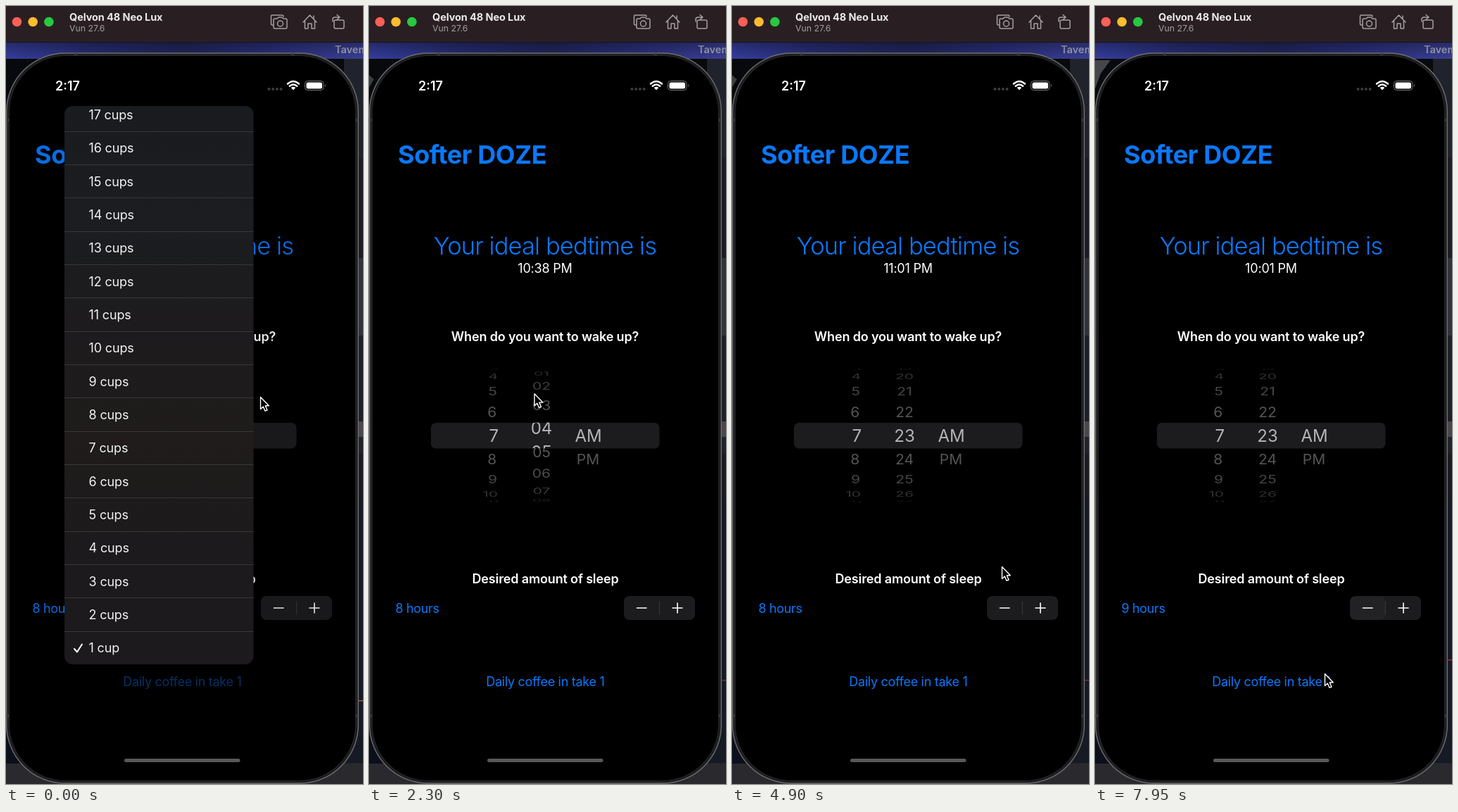
An HTML page with a canvas that plays this animation: 507 px wide and 1105 px high, repeating every 8 s.

```html
<!DOCTYPE html>
<html lang="en">
<head>
<meta charset="utf-8">
<title>Bedtime planner</title>
<style>
html, body { margin: 0; width: 100%; height: 100%; overflow: hidden; background: #000; }
canvas { display: block; }
</style>
</head>
<body>
<canvas id="stage" width="507" height="1105"></canvas>
<script>
const ctx = document.getElementById('stage').getContext('2d');
const LOOP = 8000, STEP = 50;
const BLUE = '#0a78fb', PANEL = '#1c1c1f';
const clamp = x => Math.max(0, Math.min(1, x));
const mix = (a, b, p) => a + (b - a) * p;
const smooth = p => p * p * (3 - 2 * p);

function text(str, x, y, size, color, { weight = 400, align = 'left', spacing = 0 } = {}) {
  ctx.font = `${weight} ${size}px Inter, sans-serif`;
  ctx.letterSpacing = spacing + 'px';
  ctx.textAlign = align;
  ctx.fillStyle = color;
  ctx.fillText(str, x, y);
}
function rect(x, y, w, h, color) {
  ctx.fillStyle = color;
  ctx.fillRect(x, y, w, h);
}
function round(x, y, w, h, r, fill, stroke, width = 1) {
  ctx.beginPath();
  ctx.roundRect(x, y, w, h, r);
  if (fill) { ctx.fillStyle = fill; ctx.fill(); }
  if (stroke) { ctx.strokeStyle = stroke; ctx.lineWidth = width; ctx.stroke(); }
}
function path(d, { x = 0, y = 0, fill, stroke, width = 1.5 } = {}) {
  const shape = new Path2D(d);
  ctx.save();
  ctx.translate(x, y);
  ctx.lineWidth = width;
  ctx.lineJoin = ctx.lineCap = 'round';
  if (fill) { ctx.fillStyle = fill; ctx.fill(shape); }
  if (stroke) { ctx.strokeStyle = stroke; ctx.stroke(shape); }
  ctx.restore();
}
function dot(x, y, r, color) {
  ctx.beginPath();
  ctx.arc(x, y, r, 0, 7);
  ctx.fillStyle = color;
  ctx.fill();
}
function gradient(x0, y0, x1, y1, ...colors) {
  const g = ctx.createLinearGradient(x0, y0, x1, y1);
  colors.forEach((c, i) => g.addColorStop(i / (colors.length - 1), c));
  return g;
}

// Desktop peeking out around the simulator window
function drawDesktop(t) {
  rect(0, 0, 507, 1105, gradient(0, 75, 0, 1105, '#08090c', '#0b0c10', '#0c101c'));
  rect(480, 75, 27, 1030, '#20232b');
  rect(500, 215, 7, 143, '#1d1c26');
  rect(500, 358, 7, 110, '#30343a');
  rect(500, 468, 7, 122, '#1c2028');
  rect(500, 590, 7, 22, '#4b474b');
  rect(500, 636, 7, 64, '#1b1a22');
  rect(480, 700, 27, 375, '#151a25');
  rect(0, 1076, 507, 29, '#2a2a2e');
  const [lineY, lineColor] = t < 350 ? [986, '#a8572b'] : t < 7200 ? [957, '#7d2c2c'] : [928, '#b02a2a'];
  rect(500, lineY, 7, 1.5, lineColor);
  if (t >= 7200) path('M0 77 H22 L8 96 L0 118 Z', { fill: '#45474a' });
  else if (t >= 350) path('M0 98 L7 104 L0 116 Z', { fill: '#3b3d40' });
  rect(0, 52, 507, 23, gradient(0, 0, 507, 0, '#353d9c', '#262c72', '#20265c', '#2a307c', '#3a3f94'));
  text('Tavem', 467, 67, 14.5, '#a9abc4', { weight: 600 });
  rect(0, 52, 507, 23, gradient(0, 52, 0, 75, 'rgba(0,0,0,.3)', 'rgba(0,0,0,0)'));
}

function drawTitleBar() {
  rect(0, 0, 507, 52, '#291f23');
  rect(0, 51, 507, 1, '#1a1417');
  ['#fe5f57', '#febc2e', '#28c840'].forEach((c, i) => dot(15.5 + 22.7 * i, 22.5, 6.8, c));
  text('Qelvon 48 Neo Lux', 90, 20.5, 14.5, '#ece8ea', { weight: 700, spacing: -0.1 });
  text('Vun 27.6', 90, 36, 12.3, '#a39c9f');
  const icon = { stroke: '#a69fa2', width: 1.5 };
  path('M379 27 H378 Q376.500 27 376.500 25 V15 Q376.500 13 378 13 H392 Q394 13 394 15 M382 18 H385 L387 16 H392 L394 18 H397 Q399 18 399 20 V30 Q399 32 397 32 H382 Q380 32 380 30 V20 Q380 18 382 18 Z M393.500 25 a4 4 0 1 0 -8 0 a4 4 0 1 0 8 0', icon);
  path('M422 23 L431.500 13 L441 23 M424.500 21 V32 H429 V25 H434 V32 H438.500 V21 M437 18 V14', icon);
  path('M468 20 H478 Q480 20 480 22 V30 Q480 32 478 32 H468 Q466 32 466 30 V22 Q466 20 468 20 M464 22 V19 Q464 16 467 16 H473 M470 12.500 L474 16 L470 19.500', icon);
}

function drawPhone() {
  round(0.8, 67, 499.500, 1037, 83, '#1d1d1f', '#6e6e70', 1.4);
  round(4.5, 70.5, 492, 1030, 80, '#000', '#29292b', 1);
  [97, 405].forEach(x => rect(x, 67, 4, 3, '#39393b'));
  [160, 1006].forEach(y => [1, 497].forEach(x => rect(x, y, 3, 4, '#39393b')));
  text('2:17', 70, 119.5, 18, '#fff', { weight: 600 });
  for (let i = 0; i < 4; i++) dot(373.5 + 5.7 * i, 118, 2, '#3d3d3f');
  path('M400 110.500 Q408 103.500 416 110.500 M402.800 113.700 Q408 109.200 413.200 113.700', { stroke: '#fff', width: 2.5 });
  path('M404.800 116 Q408 113.500 411.200 116 L408 119.500 Z', { fill: '#fff' });
  round(424.5, 106.5, 26.5, 13, 4, null, '#777', 1);
  round(426.5, 108.5, 22.5, 9, 2.5, '#fff');
  path('M453 111 Q455 113 453 115 Z', { fill: '#777' });
  round(168, 1069, 164.5, 5, 2.5, '#58585a');
}

// Wheel values in rows: a short drag, then a flick that slows down and settles
function minuteAt(t) {
  if (t < 2200) return mix(56, 60, clamp((t - 2050) / 150));
  return 83 - Math.max(0, 27.2 * Math.exp(-(t - 2120) / 490) - 0.15);
}
function hourAt(t) {
  if (t < 3350) return mix(7, 10, clamp((t - 3050) / 300) ** 2);
  return 31 - 21 * (1 - clamp((t - 3350) / 1625)) ** 3;
}
function firstTime(test) {
  let t = 0;
  while (t < LOOP && !test(t)) t += STEP;
  return t;
}
const noon = firstTime(t => hourAt(t) >= 12), midnight = firstTime(t => hourAt(t) >= 24);
const halfDayAt = t => smooth(clamp((t - noon) / 250)) - smooth(clamp((t - midnight) / 250));

function drawWheel(value, label, x, align, innerShift) {
  const middle = 610, radius = 95, angle = 0.36;
  const region = (rects, draw) => {
    ctx.save();
    ctx.beginPath();
    rects.forEach(r => ctx.rect(...r));
    ctx.clip();
    draw();
    ctx.restore();
  };
  const rows = draw => {
    for (let i = Math.round(value) - 4; i <= Math.round(value) + 4; i++) {
      const a = (i - value) * angle;
      if (Math.abs(a) < 1.55 && label(i)) draw(label(i), middle + radius * Math.sin(a), Math.cos(a));
    }
  };
  region([[88, 515, 324, 77], [88, 628, 324, 77]], () => rows((str, y, depth) => {
    const grey = 24 + (depth - 0.13) * 76;
    ctx.save();
    ctx.translate(x + (align === 'right' ? 4 * (1 - depth) : 0), y);
    ctx.scale(1, depth);
    text(str, 0, 7.6, 21, `rgb(${grey},${grey},${grey})`, { align });
    ctx.restore();
  }));
  region([[88, 592, 324, 36]], () => rows((str, y) =>
    text(str, x + innerShift, y + 8.6, 24, '#b4b4b6', { align })));
}

const plusClicks = [5300, 5530, 5760, 5980], minusClicks = [6750, 7100, 7450];
const countBefore = (clicks, t) => clicks.filter(c => t >= c).length;
const hoursAt = t => 8 + countBefore(plusClicks, t) - countBefore(minusClicks, t);
function pressAt(clicks, t) {
  const last = clicks.filter(c => t >= c).pop();
  return last === undefined ? 0 : 1 - clamp((t - last - 130) / 450);
}
function bedtimeAt(t) {
  if (t < 4700) return '10:38 PM';
  return `${11 - (hoursAt(t) - 8)}:01 PM`;
}

function drawStepper(t) {
  const hours = hoursAt(t);
  text(hours + ' hours', 37.5, 861.5, 18, BLUE, { spacing: -0.35 });
  round(362, 838, 101, 34, 8, PANEL);
  const shade = (x, amount) => {
    if (amount) round(x, 838, 50.5, 34, 8, `rgba(66,66,70,${amount * 0.9})`);
  };
  shade(362, pressAt(minusClicks, t));
  shade(412.5, pressAt(plusClicks, t));
  rect(412, 846, 1, 18, '#38373b');
  path('M380.500 855 H394', { stroke: '#fff', width: 1.6 });
  path('M431 855 H445 M438 848 V862', { stroke: hours >= 12 ? '#77777a' : '#fff', width: 1.6 });
}

function drawApp(t) {
  const heading = { align: 'center', weight: 600, spacing: -0.15 };
  text('Softer DOZE', 41, 224, 36, BLUE, { weight: 700, spacing: -0.4 });
  text('Your ideal bedtime is', 250, 352.5, 34.5, BLUE, { weight: 300, align: 'center', spacing: -0.9 });
  text(bedtimeAt(t), 250, 378.5, 18, '#fff', { align: 'center', spacing: -0.2 });
  text('When do you want to wake up?', 250, 476, 18, '#fff', heading);
  round(88, 592, 324.5, 36.5, 7, PANEL);
  drawWheel(hourAt(t), i => String((i + 11) % 12 + 1), 181, 'right', 3);
  drawWheel(minuteAt(t), i => String(i % 60).padStart(2, '0'), 245, 'center', 0);
  drawWheel(halfDayAt(t), i => ['AM', 'PM'][i], 311, 'center', 0.5);
  text('Desired amount of sleep', 250.5, 820, 18, '#fff', heading);
  drawStepper(t);
  ctx.globalAlpha = mix(0.4, 1, clamp((t - 150) / 300));
  text('Daily coffee in take 1', 250.3, 965.5, 18, BLUE, { align: 'center', spacing: -0.3 });
  ctx.globalAlpha = 1;
}

function drawMenu(t) {
  const p = t < 200 ? 0 : clamp((t - 140) / 350);
  if (p === 1) return;
  rect(5, 135, 491, 800, `rgba(0,0,0,${0.1 * (1 - p)})`);
  const scale = 1 - 0.8 * p;
  ctx.save();
  ctx.globalAlpha = 1 - p;
  ctx.translate(250, 945);
  ctx.scale(scale, scale);
  ctx.translate(-250, -945);
  round(83, 142, 268.5, 793, 12, gradient(0, 142, 0, 935, '#1a1b1e', '#1b1d20', '#1d1b1d', '#1f1c1b', '#1c1a1c', '#1c1a1d'));
  ctx.clip();
  const row = 47.33;
  for (let n = 1; n <= 17; n++) {
    const y = 912 - row * (n - 1);
    text(n + (n > 1 ? ' cups' : ' cup'), 117.5, y + 6.2, 18, '#f2f2f3', { spacing: -0.15 });
    if (n < 17) rect(83, Math.round(y - 24.3), 269, 1, '#38373a');
  }
  path('M97 913 L101 917.500 L108 906.500', { stroke: '#fff', width: 2 });
  ctx.restore();
}

// Pointer stops: time, x, y
const pointerStops = [
  [0, 361, 555], [400, 361, 555], [1400, 236, 735], [1650, 233, 731], [2050, 240, 668],
  [2200, 238, 545], [2450, 228, 560], [2950, 198, 617], [3050, 194, 624], [3350, 184, 525],
  [3800, 181, 522], [4100, 190, 540], [4900, 383, 796], [5250, 437, 850], [6300, 437, 850],
  [6650, 384, 852], [7580, 384, 852], [7950, 326, 948], [8000, 326, 948]
];
function drawPointer(t) {
  const next = pointerStops.findIndex(s => s[0] > t);
  const [t0, x0, y0] = pointerStops[next - 1], [t1, x1, y1] = pointerStops[next];
  const p = smooth((t - t0) / (t1 - t0));
  path('M0.500 0.500 V17.500 L4.300 14 L7 20.200 L10 19 L7.300 12.800 H12.300 Z',
    { x: mix(x0, x1, p), y: mix(y0, y1, p), fill: '#000', stroke: '#fff', width: 1.4 });
}

function frame(now) {
  let t = Math.floor(now % LOOP / STEP) * STEP;
  if (t < 200) t = 0;
  else if (t < 350) t = 200;
  drawDesktop(t);
  drawTitleBar();
  drawPhone();
  drawApp(t);
  drawMenu(t);
  drawPointer(t);
  requestAnimationFrame(frame);
}
requestAnimationFrame(frame);
</script>
</body>
</html>
```
